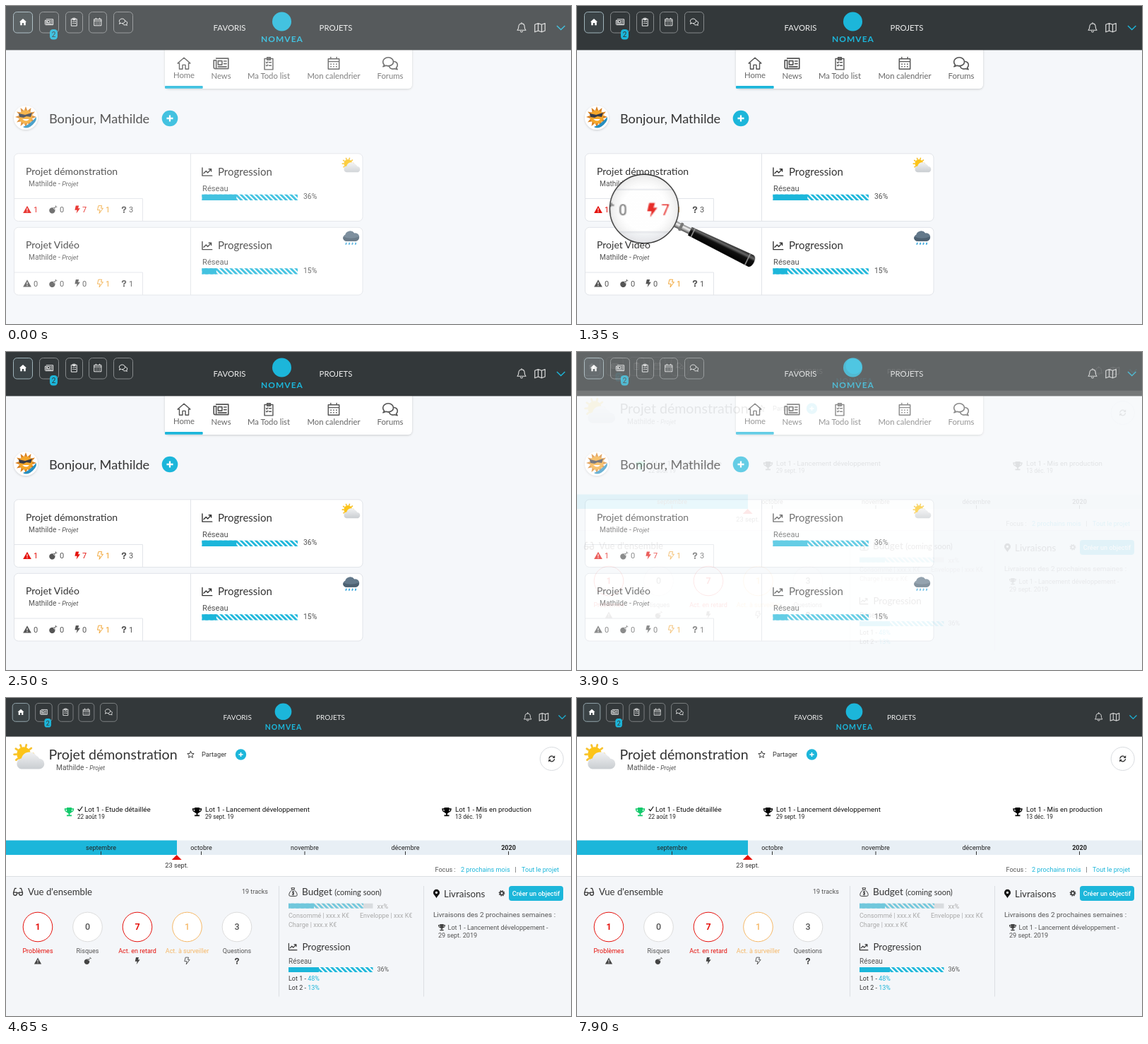
Animation of 800 by 450 pixels, one loop 8000 ms. Source, as an HTML page:

```html
<!DOCTYPE html>
<html lang="fr">
<head>
<meta charset="utf-8">
<title>Tableau de bord</title>
<style>
  html, body { margin: 0; width: 100%; height: 100%; overflow: hidden; background: #fff; }
  svg { display: block; }
  #stage { width: 800px; height: 450px; font-family: Roboto, sans-serif; }
  .round { font-family: Lato, sans-serif; }
  .line { fill: none; stroke: currentColor; stroke-linejoin: round; stroke-linecap: round; }
  .solid { fill: currentColor; fill-rule: evenodd; }

  .home, .project, .glass, .move, .zoom, .focus { animation: 8s linear infinite; }
  .home { animation-name: home; }
  .project { animation-name: project; }
  .glass { animation-name: glass; }
  .move { animation-name: move; }
  .zoom { animation-name: zoom; filter: blur(.35px); }
  .focus { animation-name: focus; }

  @keyframes home { 0% { opacity: .83 } 1.9%, 46.25% { opacity: 1 } 56.25%, 100% { opacity: 0 } }
  @keyframes project {
    0% { opacity: 0 }
    46.25% { opacity: 0; animation-timing-function: ease-in }
    56.25%, 100% { opacity: 1 }
  }
  @keyframes glass { 0%, 7.5% { opacity: 0 } 10%, 23.5% { opacity: 1 } 26%, 100% { opacity: 0 } }
  @keyframes move {
    0%, 8.75% { transform: translate(37px, 287px) }
    25%, 100% { transform: translate(153px, 287px) }
  }
  @keyframes zoom {
    0%, 8.75% { transform: scale(1.88) translate(-37px, -287px) }
    25%, 100% { transform: scale(1.88) translate(-153px, -287px) }
  }
  @keyframes focus {
    0%, 60% { opacity: 0 } 66%, 74% { opacity: 1 } 81%, 82.5% { opacity: 0 }
    87%, 93% { opacity: 1 } 98%, 100% { opacity: 0 }
  }
</style>
</head>
<body>
<svg id="stage" viewBox="0 0 800 450"></svg>
<script>
const CYAN = '#1cb6da', INK = '#333', GREY = '#555', RED = '#e5120d', ORANGE = '#f0a12c';

const line = (d, width = 1.2) => `<path class="line" stroke-width="${width}" d="${d}"/>`;
const solid = d => `<path class="solid" d="${d}"/>`;
const HOUSE = 'M8 1.5L.5 8H2.5V15H6.3V10H9.7V15H13.5V8H15.5Z';
const BOLT = 'M5 .5H11L9.5 5.5H13.5L6 15.5L7.5 9H3Z';

const icons = {
  house: solid(HOUSE),
  home: line(HOUSE),
  news: line('M3 3H15.5V13.5H2Q.5 13.5 .5 12V5H3V12.5M5 5.5H9V9.5H5ZM11 5.8H13.5M11 8.5H13.5M5 11.5H13.5'),
  todo: line('M3 2.5H13V15.5H3ZM6 1H10V4H6ZM5 7L5.7 7.7L7 6.4M8.5 7H11M5 10.5L5.7 11.2L7 10M8.5 10.7H11'),
  calendar: line('M1.5 2.8H14.5V15H1.5ZM1.5 6H14.5M4.5 .8V2.8M11.5 .8V2.8M4.5 9H5M7.8 9H8.2M11 9H11.5M4.5 12H5M7.8 12H8.2M11 12H11.5'),
  chat: line('M2 9.8Q.5 8.3 .5 6.5C.5 4 3 2 6 2S11.3 4 11.3 6.5S9 10.8 6 10.8Q4.7 10.8 3.7 10.4L.7 11.5ZM11.3 6C14 6.3 15.5 8 15.5 9.8Q15.5 11.5 14.2 12.6L15.3 14.4L12.5 13.6C10 14.4 7.5 13.4 6.6 10.8'),
  bell: line('M8 2C5 2 3.5 4.3 3.5 7C3.5 9.8 2.6 10.6 1.6 12H14.4C13.4 10.6 12.5 9.8 12.5 7C12.5 4.3 11 2 8 2ZM8 .6V2M6.4 13.7A1.7 1.7 0 0 0 9.6 13.7'),
  map: line('M.8 3.8L5.5 2L10.5 3.8L15.2 2V12.5L10.5 14.3L5.5 12.5L.8 14.3ZM5.5 2V12.5M10.5 3.8V14.3'),
  warn: solid('M8 1L15.8 14.8H.2ZM7.1 5.6H8.9L8.6 10.3H7.4ZM7.2 11.4H8.8V13H7.2Z'),
  bomb: solid('M6.5 4A5.8 5.8 0 1 1 6.4 4ZM9.3 3.5L12.3 6.5L10.8 8L7.8 5Z') + line('M11 5L13.5 2.5M13.5 .8V1.4M15 2.8H15.5', 1.4),
  bolt: solid(BOLT),
  boltLine: line(BOLT, 1.3),
  question: line('M4.2 5C4.2 .8 12 .8 12 5C12 8 8 7.5 8 10.3', 3) + solid('M6.3 12.6H9.7V16H6.3Z'),
  chart: line('M.8 2V14H15.5M3 10.5L6.5 7L9 9.5L14.3 4M10.7 4H14.3V7.5', 1.5),
  trophy: solid('M4 1H12V2.7H15.7C15.7 6.5 14 8.7 11.3 9.2Q10.3 10.5 9 10.9V13H12V15.2H4V13H7V10.9Q5.7 10.5 4.7 9.2C2 8.7 .3 6.5 .3 2.7H4ZM2 4.2Q2.4 6.5 4.2 7.4L4 4.2ZM12 4.2L11.8 7.4Q13.6 6.5 14 4.2Z'),
  star: line('M8 1.2L10 5.7L14.8 6.2L11.2 9.5L12.2 14.4L8 11.9L3.8 14.4L4.8 9.5L1.2 6.2L6 5.7Z', 1.4),
  sync: line('M2.5 7A5.6 5.6 0 0 1 12.6 4.8M13.5 9A5.6 5.6 0 0 1 3.4 11.2', 2) + solid('M14.6 1.2V6.6H9.2ZM1.4 14.8V9.4H6.8Z'),
  glasses: line('M.9 9.5L3 3H5M15.1 9.5L13 3H11M.9 9.2H6.3V11.5Q6 13.8 3.6 13.8T.9 11.5ZM9.7 9.2H15.1V11.5Q14.8 13.8 12.4 13.8T9.7 11.5ZM6.3 10H9.7', 1.4),
  bag: line('M5.3 1H10.7L9.4 4.2H6.6ZM6.6 4.2C2.5 7 1 10.5 1 13Q1 15.2 3 15.2H13Q15 15.2 15 13C15 10.5 13.5 7 9.4 4.2M9.8 8Q8 6.8 6.7 7.8C5.6 9.3 10.3 9.5 9.6 11.6Q8.6 13 6.3 12M8 6.5V13.6'),
  pin: solid('M8 0A5.8 5.8 0 0 0 2.2 6C2.2 9.5 6 11.5 8 16C10 11.5 13.8 9.5 13.8 6A5.8 5.8 0 0 0 8 0ZM8 3.8A2.1 2.1 0 1 1 7.9 3.8Z'),
  gear: '<g fill="none" stroke="currentColor"><circle cx="8" cy="8" r="4" stroke-width="3.2"/><circle cx="8" cy="8" r="6" stroke-width="2.8" stroke-dasharray="2.356"/></g>',
  check: line('M2 9L6 13.5L14 2', 2.4),
  sunny: `<g stroke="#f7c331" stroke-width="1.1" stroke-linecap="round">${
    Array.from({ length: 10 }, (_, i) => `<path d="M5.5 .3V1.4" transform="rotate(${i * 36 - 20} 5.5 5.6)"/>`).join('')
  }</g><circle cx="5.5" cy="5.6" r="3.9" fill="#fcc419"/>
    <path d="M3.5 15.5A3 3 0 0 1 3.6 9.6A4.6 4.6 0 0 1 11.8 8A3 3 0 0 1 13.5 9.7A2.9 2.9 0 0 1 13.3 15.5Z" transform="translate(.6 -1.6)" fill="url(#cloud)"/>`,
  rainy: `<path d="M3.4 10.2A3.2 3.2 0 0 1 2.8 4.2A5 5 0 0 1 11.6 2.6A3.6 3.6 0 0 1 13 10.2Z" fill="#62788a"/>
    <path d="M3.4 10.2A3.2 3.2 0 0 1 1 6Q8 9 15.8 6A3.6 3.6 0 0 1 13 10.2Z" fill="#4c6071"/>
    <path d="M4 11.5L3.4 13.5M7 11.5L6.4 13.5M10 11.5L9.4 13.5M13 11.5L12.4 13.5" stroke="#3fa9dc" stroke-width="1.2"/>`
};

const symbols = Object.entries(icons)
  .map(([id, body]) => `<symbol id="${id}" viewBox="0 0 16 16" overflow="visible">${body}</symbol>`).join('');

// Icons are placed by their centre.
const icon = (id, x, y, size, color = INK) =>
  `<use href="#${id}" x="${x - size / 2}" y="${y - size / 2}" width="${size}" height="${size}" color="${color}"/>`;
const text = (x, y, size, str, color = INK, extra = '') =>
  `<text x="${x}" y="${y}" font-size="${size}" fill="${color}" ${extra}>${str}</text>`;
const title = (x, y, size, str, color = INK, extra = '') => text(x, y, size, str, color, 'class="round" ' + extra);
const rect = (x, y, w, h, fill, extra = '') =>
  `<rect x="${x}" y="${y}" width="${w}" height="${h}" fill="${fill}" ${extra}/>`;
const path = (d, stroke, extra = '') => `<path d="${d}" fill="none" stroke="${stroke}" ${extra}/>`;
const MID = 'text-anchor="middle"', BOLD = 'font-weight="700"';
const link = str => `<tspan fill="${CYAN}">${str}</tspan>`;
const owner = (x, y, size) =>
  text(x, y, 10.2, `Mathilde - <tspan font-style="italic" font-size="${size}">Projet</tspan>`, GREY);
const plus = (x, y, r) => `<circle cx="${x}" cy="${y}" r="${r}" fill="${CYAN}"/>` +
  path(`M${x - r * .4} ${y}h${r * .8}M${x} ${y - r * .4}v${r * .8}`, '#fff', `stroke-width="${r * .2}"`);
const bar = (x, y, w, h, done, end = w) =>
  rect(x, y, end, h, 'url(#stripes)') + rect(x, y, done, h, CYAN);

function header(k, centre) {
  const buttons = [['house', 10, 28], ['news', 47, 28], ['todo', 84, 25], ['calendar', 117, 26], ['chat', 152, 28]];
  return rect(0, 0, 800, 62.4 * k, '#33383a') +
    `<g transform="scale(${k})">` + buttons.map(([id, x, w], i) =>
      rect(x + .5, 8.5, w - 1, 29.5, i ? 'none' : '#3b4346', `rx="5" stroke="${i ? '#85898b' : '#9fb3ba'}"`) +
      icon(id, x + w / 2, 22.5, i ? 12 : 11, '#fff')).join('') +
      rect(62, 33, 11, 14.5, CYAN, 'rx="4.5"') + text(67.5, 44, 10, '2', INK, MID) +
    `</g><g transform="translate(${centre}) scale(${k})">` +
      title(-74, 35, 11.4, 'FAVORIS', '#eee', MID) + title(76.5, 35, 11.4, 'PROJETS', '#eee', MID) +
      `<circle cy="22" r="13.5" fill="${CYAN}"/>` +
      title(.5, 51, 12, 'NOMVEA', CYAN, `${MID} ${BOLD} letter-spacing="1"`) +
    `</g><g transform="translate(800) scale(${k})">` +
      icon('bell', -70, 30.5, 15, '#ddd') + icon('map', -44, 30.5, 16, '#ddd') +
      path('M-20 28l5.7 5.5l5.7-5.5', CYAN, 'stroke-width="1.4"') + '</g>';
}

function card(dy, name, weather, percent, counts) {
  const [problems, late] = counts;
  const marks = [
    ['warn', 30, 12, 39, problems ? RED : GREY], ['bomb', 66.5, 11.5, 76, GREY],
    ['bolt', 101, 11.5, 108, late ? RED : GREY], ['boltLine', 133.5, 11.5, 141, ORANGE], ['question', 167, 9.5, 174, GREY]
  ];
  return `<g transform="translate(0 ${dy})">` +
    rect(11.5, 208.8, 493.5, 95.7, '#fff', 'rx="6" stroke="#e1e4e9"') +
    path('M261.5 209V304.5M12 272.5H193.5V304.5', '#e1e4e9') +
    title(28, 238.5, 14, name) + owner(32, 254.7, 9) +
    marks.map(([id, x, size, tx, color], i) => icon(id, x, 288, size, color) + text(tx, 292, 11, counts[[0, 2, 1, 3, 4][i]], color)).join('') +
    icon('chart', 284.7, 234.5, 15) + title(300, 239.5, 15, 'Progression') +
    text(278, 261.5, 11.2, 'Réseau', GREY) + bar(277.5, 266.7, 135.5, 8.3, 135.5 * percent / 100) +
    text(421, 273.3, 10.4, percent + '%', GREY) + icon(weather, 488, weather === 'sunny' ? 226.5 : 225, 24) + '</g>';
}

function avatar() {
  const rays = Array.from({ length: 12 }, (_, i) =>
    `<path d="M25 150L28 142L31 150Z" fill="#d98324" transform="rotate(${i * 30} 28 157)"/>`).join('');
  return `<circle cx="28" cy="158" r="17" fill="#fff" filter="url(#shadow)"/>${rays}
    <circle cx="28" cy="157" r="9.5" fill="#f4a62a"/>
    <path d="M18 152L27 154L37 151L35 157L29 156L25 158L19 157Z" fill="#373b48"/>
    <path d="M23 160Q29 165 33 160Z" fill="#fff"/>
    <path d="M24 171Q32 169 43 157Q44 164 34 171Q28 174 24 171Z" fill="#278fc0"/>`;
}

function home() {
  const tabs = [['home', 252, 'Home'], ['news', 304.5, 'News'], ['todo', 372, 'Ma Todo list'],
    ['calendar', 464, 'Mon calendrier'], ['chat', 544, 'Forums']];
  return rect(0, 0, 800, 450, '#f5f7fa') +
    rect(225, 56, 350, 61, '#fff', 'rx="6" filter="url(#shadow)"') + header(1, 390.5) +
    rect(225, 113, 53.7, 3.8, CYAN, 'rx="1"') +
    tabs.map(([id, x, label], i) => icon(id, x, 81, id === 'news' || id === 'chat' ? 22 : 19, GREY) +
      title(x, i ? 103 : 102, 11.3, label, '#666', MID)).join('') +
    avatar() + title(61, 166, 18.2, 'Bonjour, Mathilde') + plus(232, 159, 11.3) +
    card(0, 'Projet démonstration', 'sunny', 36, [1, 7, 0, 1, 3]) +
    card(104.5, 'Projet Vidéo', 'rainy', 15, [0, 0, 0, 1, 1]);
}

const glass = `<g class="glass"><g class="move">
  <g transform="rotate(26)">
    <rect x="48" y="-4.5" width="27" height="9" rx="1" fill="url(#steel)"/>
    <rect x="56" y="-6" width="4" height="12" rx="1" fill="#777"/>
    <path d="M72 -6.5L168 -9Q173 -8 173 0T168 9L72 6.5Z" fill="url(#grip)"/>
    <path d="M77 -6.6V6.6M163 -8.8V8.8" stroke="#999" stroke-width="1.5"/>
  </g>
  <g clip-path="url(#lens)"><circle r="49" fill="#fff"/><g class="zoom"><use href="#dashboard"/></g>
    <circle r="49" fill="url(#shine)"/></g>
  <circle r="48.7" fill="none" stroke="#333" stroke-width="1.4"/>
</g></g>`;

function project() {
  const events = [[89.5, 111, 101, 'Etude détaillée', '22 août 19', '#12c96b'],
    [270.5, 282, 282, 'Lancement développement', '29 sept. 19', '#000'],
    [624, 636, 636, 'Mis en production', '13 déc. 19', '#000']];
  const months = [[134.5, 'septembre'], [276.5, 'octobre'], [423, 'novembre'], [565.5, 'décembre'], [711.5, '2020']];
  const totals = [[1, 'Problèmes', 'warn', RED], [0, 'Risques', 'bomb'], [7, 'Act. en retard', 'bolt', RED],
    [1, 'Act. à surveiller', 'boltLine', '#f5b766'], [3, 'Questions', 'question']];
  const pale = '#aaa';
  return rect(0, 0, 800, 450, '#f4f6f9') + rect(0, 0, 800, 252, '#fff') + header(.876, 392.5) +
    icon('sunny', 31.5, 85.5, 41) + title(60.5, 87, 19.6, 'Projet démonstration') + owner(71, 101.5, 8.5) +
    icon('star', 261.5, 80, 11) + text(277, 83.2, 9.2, 'Partager') + plus(332.5, 80, 7.7) +
    '<circle cx="772.7" cy="86" r="16.5" fill="#fff" stroke="#d9dce0"/>' + icon('sync', 772.7, 86, 11) +
    events.map(([cx, x, dx, label, date, color]) => icon('trophy', cx, 161, 14, color) +
      text(x, 160.7, 9.8, 'Lot 1 - ' + label, '#111') + text(dx, 171.3, 8.2, date, '#222')).join('') +
    icon('check', 105, 157, 8, '#111') +
    rect(0, 201.5, 800, 20.5, '#e8eff5') + rect(0, 201.5, 242, 20.5, CYAN) +
    months.map(([x, label]) => text(x, 215, 9, label, '#222', MID + (label === '2020' ? BOLD : '').replace('font', ' font')) +
      path(`M${x} 217v5`, INK)).join('') +
    `<path d="M241.7 222l7 7h-14z" fill="${RED}"/>` + text(241.7, 240, 9.2, '23 sept.', INK, MID) +
    text(607.5, 245.8, 9.1, 'Focus :', GREY) + text(644, 245.8, 9.1, '2 prochains mois', CYAN) +
    text(720.5, 245.8, 9.1, '|', GREY) + text(730, 245.8, 9.1, 'Tout le projet', CYAN) +
    path('M0 252.5H800M386.5 266V422.5M591.5 266V422.5', '#dcdfe3') +

    rect(6, 285.5, 357.5, 108, '#f8fafc', 'class="focus" stroke="#fff" stroke-width="1.6"') +
    icon('glasses', 17, 274, 14.5) + title(31, 278.7, 13.2, 'Vue d\'ensemble') + text(334, 277, 9, '19 tracks', GREY) +
    totals.map(([count, label, id, color], i) => {
      const x = 45 + i * 70.5;
      return `<circle cx="${x}" cy="324" r="20.8" fill="#fff" stroke="${color || '#dcdcdc'}"/>` +
        text(x, 328.4, 12.5, count, color || GREY, `${MID} font-weight="${color === RED ? 700 : 500}"`) +
        text(x, 361, 9, label, color || GREY, MID) + icon(id, x, 372, id === 'question' ? 9 : 10.5, '#444');
    }).join('') +

    icon('bag', 406.5, 274.5, 13) + title(419, 279, 13.6, 'Budget <tspan font-size="11">(coming soon)</tspan>') +
    rect(400, 290.7, 119.5, 7, '#d9dcdf') + `<g opacity=".55">${bar(400, 290.7, 119.5, 7, 36, 106)}</g>` +
    text(525.5, 297.7, 9, 'xx%', pale) + text(400, 310.5, 9, 'Consommé | xxx.x K€', pale) +
    text(501, 310.5, 9, 'Enveloppe | xxx K€', pale) + text(400, 324, 9, 'Charge | xxx.x K€', pale) +
    icon('chart', 406, 352, 12.5) + title(419.5, 356.8, 13.3, 'Progression') + text(400, 375.6, 10, 'Réseau', GREY) +
    bar(400, 381, 119.5, 7, 43) + text(525.5, 387.4, 9, '36%', GREY) +
    text(400, 400.3, 9, 'Lot 1 - ' + link('48%')) + text(400, 413.3, 9, 'Lot 2 - ' + link('13%')) +

    icon('pin', 609.5, 277, 12.5, '#111') + title(620, 281.7, 13.4, 'Livraisons') + icon('gear', 702, 276.3, 9.5, '#444') +
    rect(712, 266, 77, 21, CYAN, 'rx="4"') + text(750.5, 279.6, 9.1, 'Créer un objectif', '#fff', MID + ' font-weight="500"') +
    text(605, 310, 9.95, 'Livraisons des 2 prochaines semaines :', GREY) +
    icon('trophy', 617, 324.5, 10.5, '#444') + text(625.5, 328, 9.1, 'Lot 1 - Lancement développement -', GREY) +
    text(612, 339.3, 9.1, '29 sept. 2019', GREY);
}

const stops = (...list) => list.map(([at, color, alpha = 1]) =>
  `<stop offset="${at}" stop-color="${color}" stop-opacity="${alpha}"/>`).join('');

document.getElementById('stage').innerHTML = `<defs>${symbols}
  <pattern id="stripes" width="5" height="5" patternUnits="userSpaceOnUse" patternTransform="rotate(-45)">
    <rect width="5" height="5" fill="#fff"/><rect width="2.9" height="5" fill="${CYAN}"/></pattern>
  <filter id="shadow" x="-20%" y="-20%" width="140%" height="150%">
    <feDropShadow dx="0" dy="1" stdDeviation="1.5" flood-opacity=".18"/></filter>
  <clipPath id="lens"><circle r="49"/></clipPath>
  <linearGradient id="cloud" x2="0" y2="1">${stops([0, '#f1f2f3'], [1, '#c9cdd1'])}</linearGradient>
  <linearGradient id="steel" x2="0" y2="1">${stops([0, '#777'], [.35, '#f4f4f4'], [.65, '#aaa'], [1, '#444'])}</linearGradient>
  <linearGradient id="grip" x2="0" y2="1">${stops([0, '#222'], [.25, '#666'], [.45, '#111'], [1, '#000'])}</linearGradient>
  <radialGradient id="shine">${stops([.6, '#fff', .12], [1, '#999', .22])}</radialGradient>
</defs>
<g class="home"><g id="dashboard">${home()}</g>${glass}</g>
<g class="project">${project()}</g>`;
</script>
</body>
</html>
```
